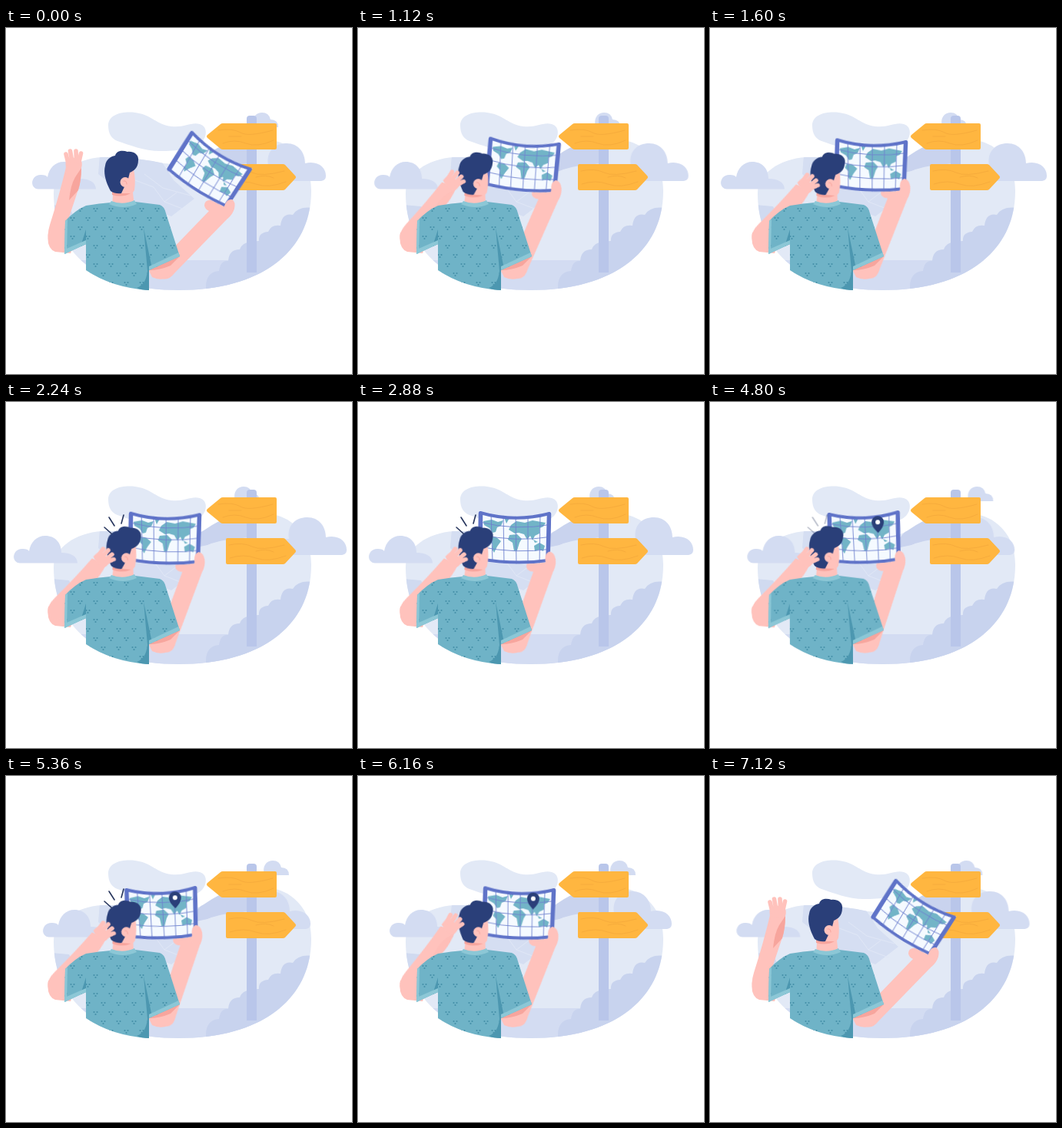
Animation, 450 px wide and 450 px high, one loop 7.2 s. Source, as an HTML page:

```html
<!DOCTYPE html>
<html lang="en">
<head>
<meta charset="utf-8">
<title>Traveller with map</title>
<style>
html, body { margin: 0; width: 100%; height: 100%; overflow: hidden; background: #fff; }
svg { display: block; width: 100vw; height: 100vh; }

.cloud-left, .cloud-right, .body, .head, .forearm, .shade, .hand, .reach, .map, .pin, .ticks {
  animation: 7.2s ease-in-out infinite;
}
.cloud-left { animation-name: drift-left; animation-timing-function: linear; }
.cloud-right { animation-name: drift-right; animation-timing-function: linear; }
.body { animation-name: lean; transform-origin: 145px 340px; }
.head { animation-name: nod; transform-origin: 150px 222px; }
.forearm { animation-name: bend; transform-origin: 66px 270px; }
.shade { animation-name: shade; }
.hand { animation-name: wrist; transform-origin: 88px 181px; }
.reach { animation-name: reach; transform-origin: 206px 312px; }
.map { animation-name: map; }
.pin { animation-name: pin; transform-origin: -27px -37px; }
.ticks { animation-name: ticks; animation-timing-function: linear; }

@keyframes drift-left {
  0%, 100% { transform: translateX(20px); }
  11% { transform: translateX(12px); }
  22.2% { transform: none; }
  28% { transform: translateX(-3px); }
  34% { transform: translateX(-5px); }
  40% { transform: none; }
  45% { transform: translateX(7px); }
  54.4% { transform: translateX(27px); }
  58% { transform: translateX(30px); }
  67% { transform: translateX(34.5px); }
  74.4% { transform: translateX(34px); }
  78% { transform: translateX(31px); }
  85.6% { transform: translateX(27px); }
  90% { transform: translateX(23.5px); }
}
@keyframes drift-right {
  0%, 100% { transform: translateX(-22px); }
  11% { transform: translateX(-14px); }
  22.2% { transform: none; }
  28% { transform: translateX(4px); }
  34% { transform: translateX(6px); }
  40% { transform: translateX(-2px); }
  45% { transform: translateX(-10px); }
  54.4% { transform: translateX(-34px); }
  58% { transform: translateX(-37px); }
  67%, 74.4% { transform: translateX(-42px); }
  78% { transform: translateX(-38px); }
  85.6% { transform: translateX(-30px); }
  90% { transform: translateX(-26px); }
}
@keyframes lean {
  0%, 42%, 69%, 100% { transform: rotate(0deg); }
  53%, 57% { transform: rotate(-2.5deg); }
}
@keyframes nod {
  0%, 98.9%, 100% { transform: rotate(0deg); }
  20%, 41%, 72%, 86% { transform: translateY(2px) rotate(4deg); }
  53%, 57% { transform: rotate(-3deg); }
}
@keyframes bend {
  0%, 98.9%, 100% { transform: rotate(0deg) scaleY(1); }
  20%, 81% { transform: rotate(26deg) scaleY(.9); }
  85.6% { transform: rotate(21deg) scaleY(.95); }
}
@keyframes shade {
  0%, 98.9%, 100% { opacity: 1; }
  20%, 81% { opacity: 0; }
}
@keyframes wrist {
  0%, 98.9%, 100% { transform: rotate(0deg); }
  20%, 81% { transform: rotate(24deg); }
}
@keyframes reach {
  0%, 98.9%, 100% { transform: rotate(0deg); }
  20%, 85.6% { transform: rotate(-22.6deg); }
  40% { transform: rotate(-24.5deg); }
  53%, 57% { transform: rotate(-26.5deg); }
  74.4% { transform: rotate(-25.5deg); }
}
@keyframes map {
  0%, 98.9%, 100% { transform: translate(287px, 234px) rotate(31.5deg) scaleY(.94); }
  20%, 22.2%, 85.6% { transform: translate(254px, 211px) rotate(1deg) scaleY(1); }
  40% { transform: translate(249px, 208px) rotate(0deg) scaleY(1); }
  53%, 57% { transform: translate(246px, 204px) rotate(-2deg) scaleY(1); }
  74.4% { transform: translate(249px, 208px) rotate(-2.5deg) scaleY(1); }
}
@keyframes pin {
  0%, 47%, 96%, 100% { transform: scale(0); }
  51%, 91% { transform: scale(1); }
}
@keyframes ticks {
  0%, 26%, 46%, 66%, 80%, 100% { opacity: 0; }
  28%, 44%, 68%, 78% { opacity: 1; }
}

.skin { fill: #ffc2bc; }
.blush { fill: #f7a59d; }
.fingers { fill: none; stroke: #ffc2bc; stroke-width: 5.6; stroke-linecap: round; }
.shirt { fill: #6fb3c7; }
.fold { fill: #4c97b0; }
.cuff { fill: #8cc7d6; }
.navy { fill: #2a3f79; }
.haze { fill: #d3dcf2; }
.grain { fill: none; stroke: #f4a93c; stroke-width: .8; stroke-linecap: round; }
</style>
</head>
<body>
<svg viewBox="0 0 450 450">
  <defs>
    <path id="blob" d="M62 215C62 190 90 170 125 168Q165 167 205 176Q240 180 262 164Q290 145 320 145Q350 143 366 153C390 168 397 190 397 212C397 292 330 341 225 341C118 341 62 292 62 215Z"/>
    <path id="paper" d="M-92 -66Q-45 -53 2 -65L0 0Q-45 6 -93 -2Z"/>
    <path id="cut" d="M136 227Q152 233 168 226L200 230Q206 232 208 241L226 297L186 315V341Q138 338 104 315V281L76 294L77 251Q90 237 104 231Q122 228 136 227Z"/>
    <clipPath id="land"><use href="#blob"/></clipPath>
    <clipPath id="sheet"><use href="#paper"/></clipPath>
    <pattern id="dots" width="20" height="24" patternUnits="userSpaceOnUse" patternTransform="translate(2 3)">
      <g id="trio" fill="#438fa8">
        <circle cx="2.5" cy="4" r="1.1"/><circle cx="6.5" cy="4" r="1.1"/><circle cx="4.5" cy="7" r="1.1"/>
      </g>
      <use href="#trio" x="10" y="12"/>
    </pattern>
  </defs>

  <path fill="#e2e9f6" d="M133 127C133 113 150 108 168 110C190 113 196 126 215 128C232 130 240 122 252 125C262 128 262 140 255 148C245 158 222 160 200 160C180 160 160 152 145 147C137 144 133 137 133 127Z"/>
  <use href="#blob" fill="#e2e9f6"/>
  <g clip-path="url(#land)">
    <path fill="#d0daf0" d="M60 230L82 232L96 262L60 262Z"/>
    <path fill="#c9d3ee" d="M234 192Q250 172 262 160L290 140L322 145V176Q280 178 262 186Z"/>
    <path fill="#d5def2" d="M122 165L200 170L218 198L245 222L215 245L165 225L120 190Z"/>
    <path fill="none" stroke="#e0e7f6" d="M168 198L192 207L206 226L232 236M180 190L204 208L240 218M206 226L222 214"/>
    <path class="haze" d="M60 302H400V345H60Z"/>
  </g>

  <path class="cloud-left haze" d="M22 209.5C10 209 12 190 26 191C30 191 33 192 34 194C36 182 44 174 55 174C68 174 76 183 76 196C87 196 97 200 97 209.5Z"/>
  <path class="cloud-left haze" d="M302 129C299 118 304 110 313 110Q322 110 324 119Q334 119 334 129Z"/>
  <path class="cloud-right haze" d="M340 199C342 185 352 178 363 178C360 160 372 150 387 150C402 150 411 162 411 176C428 172 438 182 438 192C438 198 434 199 430 199Z"/>

  <path clip-path="url(#land)" fill="#c8d3ee" d="M260 335Q261 317 277 316Q279 302 289 303Q290 288 304 288Q307 277 329 277Q328 266 341 265Q345 255 357 257Q359 240 373 243Q380 231 400 234V345H260Z"/>
  <path fill="#b9c6ea" d="M313 318V118Q313 114 317 114H322Q326 114 326 118V318Z"/>
  <g fill="#ffb640">
    <path d="M262 139L279 125Q280 124 282 124H350Q352 124 352 126V156Q352 158 350 158H282Q280 158 279 157L262 143Q260 141 262 139Z"/>
    <path d="M288 177H360Q362 177 363 178L376 192Q378 194 376 196L363 210Q362 211 360 211H288Q286 211 286 209V179Q286 177 288 177Z"/>
  </g>
  <path class="grain" d="M276 133Q295 130 305 136T347 133M282 150Q297 144 312 150T348 146M290 141H306M290 186Q308 182 320 188T362 186M291 203Q309 197 325 203T364 200M325 194Q338 190 348 195"/>

  <g class="body">
    <path class="reach skin" d="M197 321Q208 333 219 319L288 248Q297 240 297 230L270 224Q258 222 258 231Q259 236 264 238L208 296Z"/>

    <g class="map">
      <use href="#paper" fill="#f5faff"/>
      <g clip-path="url(#sheet)">
        <g fill="#72b4c7">
          <path d="M-86 -53L-75 -55L-67 -52L-60 -54L-63 -47L-68 -45L-70 -39L-74 -38L-78 -44L-85 -48Z"/>
          <path d="M-77 -33L-69 -32L-63 -27L-68 -20L-72 -12L-75 -17L-74 -23L-79 -28Z"/>
          <path d="M-52 -35L-42 -36L-36 -30L-39 -25L-42 -15L-46 -14L-48 -25L-54 -29Z"/>
          <path d="M-53 -42L-50 -48L-43 -53L-32 -51L-22 -54L-5 -51L-8 -46L-13 -44L-13 -37L-19 -34L-22 -28L-25 -34L-29 -29L-33 -36L-40 -38L-45 -37Z"/>
          <path d="M-20 -21L-13 -25L-6 -21L-8 -14L-13 -16L-19 -14Z"/>
          <path d="M-59 -58L-52 -57L-56 -50ZM-21 -29L-15 -26L-19 -25Z"/>
        </g>
        <path fill="none" stroke="#6f82cf" stroke-width=".9" d="M-76 -64L-74 0M-60 -62L-59 4M-44 -62L-43 5M-28 -62L-28 5M-12 -64L-13 4M-91 -52Q-45 -40 4 -49M-91 -36Q-45 -25 4 -33M-91 -20Q-45 -10 4 -17"/>
      </g>
      <path fill="none" stroke="#5f73c8" stroke-width="4" stroke-linejoin="round" d="M-90 -64Q-45 -51 0 -63L-2 -2Q-45 4 -91 -4Z"/>
      <path fill="none" stroke="#5f73c8" stroke-width="5.5" stroke-linecap="round" d="M-89.5 -63L-90 -4M-.5 -62L-2 -3"/>
      <g class="pin">
        <path class="navy" d="M-27 -37Q-35 -45 -35 -51A8 8 0 0 1 -19 -51Q-19 -45 -27 -37Z"/>
        <circle cx="-27" cy="-51" r="3" fill="#fff"/>
      </g>
    </g>

    <path class="reach skin" d="M276 239Q283 237 285 229Q288 222 294 223Q299 226 297 235Q295 242 288 248Z"/>
    <path class="skin" d="M186 300L222 290L219 317Q207 332 190 324L186 316Z"/>
    <path class="blush" d="M186 312L226 297L214 309Q200 315 186 315Z"/>

    <g class="head">
      <path class="skin" d="M140 202L158 177L166 184Q169 198 167 211L165 214L167 232H138Z"/>
      <path class="blush" d="M138 211L150 215L162 215Q152 221 138 217Z"/>
      <path class="navy" d="M136 212C131 203 126 190 129 179C130 171 136 167 142 166C144 159 152 159 158 161C166 160 173 165 172 172C172 182 166 186 161 188L159 196L150 215Q142 216 136 212Z"/>
      <circle class="skin" cx="155" cy="200.5" r="6.5"/>
      <path d="M153 199Q157 198 157 203" fill="none" stroke="#f7a59d" stroke-linecap="round"/>
    </g>
    <path class="ticks" fill="none" stroke="#26345c" stroke-width="1.6" stroke-linecap="round" d="M128 163L137 171M134 150L141 161M153 147L150 158"/>

    <path class="skin" d="M55 266Q52 286 64 291L84 293L94 262Z"/>
    <g class="forearm">
      <path class="skin" d="M78 181L98 180Q98 198 94 210L78 258L80 276Q68 290 58 280Q52 272 57 256Q70 215 78 181Z"/>
      <path class="shade blush" d="M98 182Q98 198 94 211L82 224Q84 204 90 194Z"/>
      <g class="hand">
        <path class="skin" d="M78 182Q77 176 78 172Q88 166 97 171Q100 176 98 182Q88 186 78 182Z"/>
        <path class="fingers" d="M81 176L78 164M86 174L83.5 160M91.5 173L91 160M95 174L97.5 163"/>
      </g>
    </g>

    <use href="#cut" class="shirt"/>
    <use href="#cut" fill="url(#dots)"/>
    <path class="fold" d="M104 262V281L97 284ZM179 260L190 313L186 315V341Q176 341 170 338Q182 334 184 316Z"/>
    <path class="cuff" d="M76 294L76.5 288L104 276V281ZM76 294L77 251L80 249L79 293ZM186 315L186 310L224.500 292L226 297Z"/>
    <path class="cuff" d="M137 225Q152 231 167 224L170 229Q152 237 134 229Z"/>
  </g>
</svg>
</body>
</html>
```
